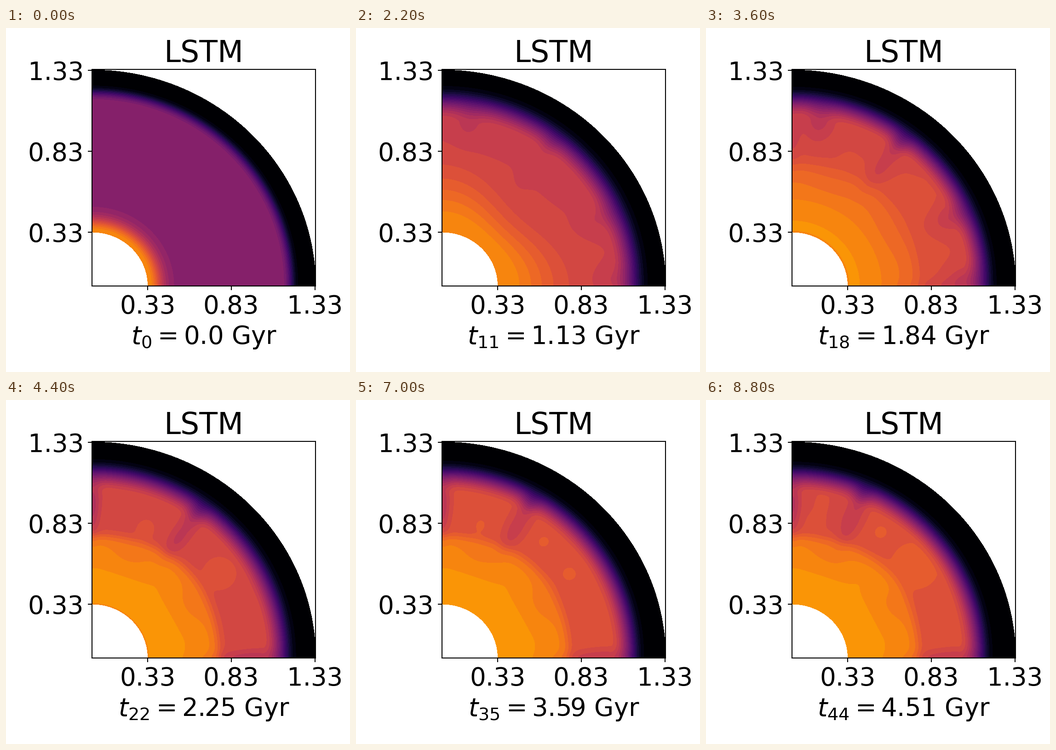
Write a matplotlib script that moves like this. It is 748 by 748 pixels and loops after 9000 ms.

```python
import numpy as np
import matplotlib.pyplot as plt
from matplotlib.animation import FuncAnimation

SIZE, DPI = 748, 187
LEFT, RIGHT, TOP, BOTTOM = 187, 673, 90, 561
W, H = RIGHT - LEFT, BOTTOM - TOP
FRAMES, STEP_MS = 45, 200
BANDS = 30
GYR_PER_STEP = 0.10249
INFERNO = plt.get_cmap("inferno")

# Polar coordinates of every pixel inside the axes
PX, PY = np.meshgrid(np.arange(W) + 0.5, H - np.arange(H) - 0.5)
X, Y = (PX - 0.5) / 364, PY / 352
R, THETA = np.hypot(X, Y), np.arctan2(Y, X)
SHELL = (R >= 0.331) & (R <= 1.336)


def ramp(step, start, end):
    """Smooth rise from 0 to 1."""
    u = np.clip((step - start) / (end - start), 0, 1)
    return u * u * (3 - 2 * u)


def pulse(step, start, peak, end):
    return ramp(step, start, peak) * (1 - ramp(step, peak, end))


def blob(r, theta, dr, dtheta, strength):
    return strength * np.exp(-((R - r) / dr) ** 2 - ((THETA - theta) / dtheta) ** 2)


def background(step):
    """Mantle with a hot layer that spreads, then settles into a shelf."""
    ripe = ramp(step, 15, 22)
    mantle = 17.4 - 6.9 * np.exp(-(step / 7.81) ** 1.3) - 0.5 * pulse(step, 16, 22, 27)
    hot = 21.9 + 0.7 * ripe - mantle

    growth = min(step / 15, 1)
    width = (0.09 + 0.25 * growth) * (1 + 0.25 * np.sin(np.pi * growth) * np.cos(4 * THETA))
    spreading = hot * np.exp(-((R - 0.33) / width) ** 2)

    r = R - 0.03 * np.sin(2 * THETA) ** 2 * np.clip((R - 0.5) / 0.3, 0, 1)
    shelf = (hot - 1.8 * ((r - 0.33) / 0.37) ** 2) / (1 + np.exp((r - 0.76) / 0.015))
    shelf += 0.45 * np.cos(8.8 * (THETA - 0.87)) * np.exp(-((R - 0.66) / 0.08) ** 2)
    shelf -= 1.3 * np.exp(-np.maximum(R - 0.331, 0) / 0.01 - max(step - 22, 0) / 6)
    return mantle + (1 - ripe) * spreading + ripe * shelf


def currents(step):
    """Cold drips and warm swells, most of them following the drifting plume."""
    late = ramp(step, 35, 44)
    ripe = ramp(step, 15, 22)
    plume = 0.937 + 0.24 * (max(step - 15, 0) / 29) ** 1.6
    cold = ramp(step, 8, 15)
    flow = blob(1.11, plume, 0.09, 0.055, -4 * cold)
    flow += blob(0.91, plume, 0.14, 0.067, -(1 + ripe) * cold)

    first_wave = pulse(step, 8, 15, 23)
    for theta in (0.04, 0.42, 1.416):
        flow += blob(1.07, theta, 0.13, 0.08, -3.3 * first_wave)
    flow += blob(0.95, 1.4, 0.17, 0.25, -first_wave)

    flow += blob(0.95, np.pi / 2, 0.17, 0.05, -3.3 * ripe)
    flow += blob(0.95, 0, 0.2, 0.055, -2.4 * ripe)

    flow += blob(0.95, plume + 0.21, 0.18, 0.2, -0.9 * late)
    flow += blob(0.96, plume + 0.21, 0.09, 0.06, 0.75 * late)
    flow += blob(0.85, plume + 0.23, 0.065, 0.06, 0.75 * ripe)
    flow += blob(0.94, plume - 0.2, 0.042, 0.042, ramp(step, 27, 35))
    flow += blob(0.92, 0.6 + 0.06 * late, 0.1 + 0.1 * late, 0.11 + 0.11 * late,
                 (0.7 + 0.3 * late) * ripe)
    return flow


def lid(step):
    """Share of heat left under the cold crust, from 0 to 1 inwards."""
    age = np.clip((step - 8) / 36, 0, 1)
    top, side = 1.238 - 0.025 * age, 1.23 - 0.033 * age
    edge = side + (top - side) * np.sin(THETA)
    depth = 0.1 + 0.14 * ramp(step, 0, 7) - 0.04 * ramp(step, 7, 15)
    return np.sin(np.pi / 2 * np.clip((edge - R) / depth, 0, 1)) ** 1.5


def picture(step):
    heat = (background(step) + currents(step)) * lid(step)
    rgb = INFERNO(np.ceil(np.clip(heat, 0, BANDS)) / BANDS)[..., :3]
    rgb[~SHELL] = 1
    return rgb


def caption(step):
    return f"$t_{{{step}}} = {round(step * GYR_PER_STEP, 2)}$ Gyr"


plt.rcParams["font.family"] = "DejaVu Sans"
fig = plt.figure(figsize=(SIZE / DPI, SIZE / DPI), dpi=DPI, facecolor="white")
ax = fig.add_axes([LEFT / SIZE, 1 - BOTTOM / SIZE, W / SIZE, H / SIZE])
image = ax.imshow(picture(0), extent=(0, W, 0, H), aspect="auto",
                  interpolation="nearest")
radii = np.array([0.33, 0.83, 1.33])
ax.set_xticks(radii * 364 + 0.5, radii, fontsize=21)
ax.set_yticks(radii * 352 + 1, radii, fontsize=21)
ax.set_title("LSTM", fontsize=25)
ax.set_xlabel(caption(0), fontsize=21)


def update(step):
    image.set_data(picture(step))
    ax.set_xlabel(caption(step))
    return [image]


anim = FuncAnimation(fig, update, frames=FRAMES, interval=STEP_MS,
                     repeat=True, repeat_delay=0, blit=False)
plt.show()
```
